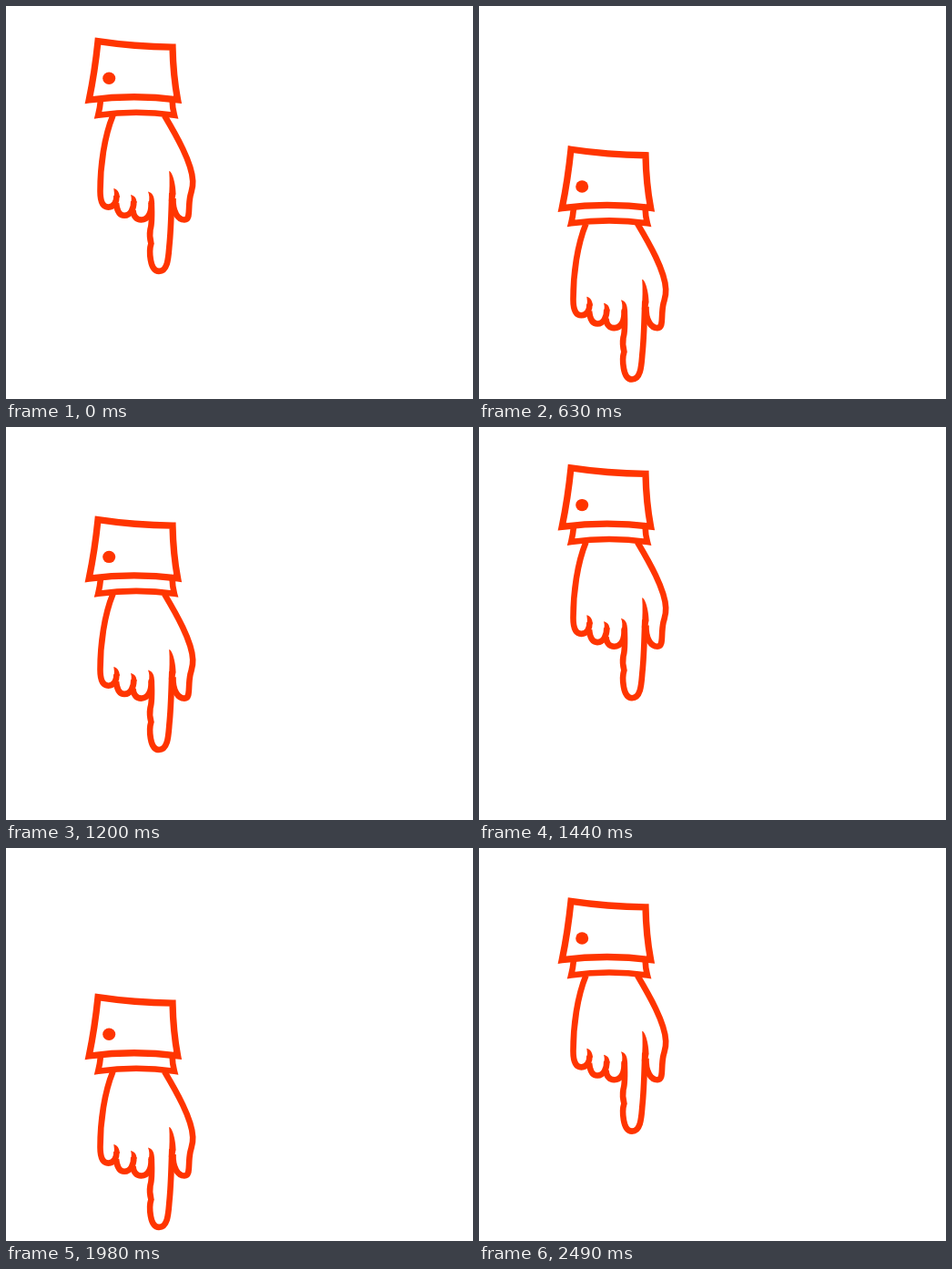
An HTML page with a canvas for the animation above (2520 ms loop, 513 by 431 pixels).

```html
<!DOCTYPE html>
<html lang="en">
<head>
<meta charset="utf-8">
<title>Pointing hand</title>
<style>
  html, body { margin: 0; width: 100%; height: 100%; overflow: hidden; background: #fff; }
  canvas { display: block; }
</style>
</head>
<body>
<canvas id="stage" width="513" height="431"></canvas>
<script>
const ctx = document.getElementById('stage').getContext('2d');
const INK = '#ff3500';
const STEP = 30, STEPS = 84, TRAVEL = 135;

const cuff = new Path2D(
  'M101 38.6 Q141 44.6 183 45.1 Q183.6 76 188.6 102.8 Q140 96.6 91.2 103 Q97.6 72 101 38.6 Z');
const band = new Path2D(
  'M104 103 Q103.2 112 101.2 119.7 Q143 113.8 184.9 119.7 Q182.8 112 182.6 103');

const outlines = [
  // back of the hand and little finger
  'M117.5 120 C108 143 103.5 175 103.5 203 C103.5 214 106 220.6 112.5 220.6 C119 220.6 121.6 214 121.5 208',
  // ring finger
  'M121 216 C122 226 125 229.8 130 229.8 C137 229.8 140.5 222 140.3 214',
  // middle finger
  'M139.5 224 C140 231 143.5 234.5 148.5 234.5 C156 234.5 159.6 227 159.8 216',
  // index finger
  'M159.7 214 C160.3 228 160.8 238 158.5 245 C157.3 252 158.2 256 159.4 260.5 ' +
  'C157 268 157.6 290.9 168 290.9 C178 290.9 178.4 275 179.4 263 C181.3 245 181.6 225 182.3 205',
  // thumb and wrist
  'M183.5 211 C183 226 189 234.5 196 234.5 C203.3 234.5 199.5 222 202.5 208 ' +
  'C204 202 205.6 199 205.2 192 C204.5 172 186.5 141 174 120'
].map(d => new Path2D(d));

// tapered tips of the creases between the fingers
const creases = new Path2D([
  'M118.3 200 C122.5 201 125 205 124.8 210 L118.2 210 C119.6 206 118.6 203 118.3 200 Z',
  'M137 207 C141.5 208 143.6 211 143.5 216 L137 216 C138.4 212 137.6 209 137 207 Z',
  'M156 203.5 C161 205 163.2 209 163 217 L156.6 217 C158 211 157.4 207 156 203.5 Z',
  'M179.2 181 C183.5 182 186.6 198 186.6 206 L184.8 214 L178.8 214 C179.6 203 180 191 179.2 181 Z'
].join(' '));

function bezier(x1, y1, x2, y2) {
  const at = (s, a, b) => 3 * (1 - s) ** 2 * s * a + 3 * (1 - s) * s * s * b + s ** 3;
  return x => {
    let lo = 0, hi = 1;
    for (let i = 0; i < 30; i++) {
      const mid = (lo + hi) / 2;
      if (at(mid, x1, x2) < x) lo = mid; else hi = mid;
    }
    return at(lo, y1, y2);
  };
}

const smooth = u => u * u * (3 - 2 * u);

// start and end in steps, position from and to, easing
const moves = [
  [1, 28, 0, 1, bezier(1 / 6, 1 / 6, 2 / 3, 1)],
  [28, 51, 1, 0, smooth],
  [51, 69, 0, 1, smooth],
  [69, 85.2, 1, 0, bezier(0.13, 0, 5 / 6, 5 / 6)]
];

function offsetAt(step) {
  const [start, end, from, to, ease] = moves.find(m => step < m[1]);
  const u = Math.max(0, (step - start) / (end - start));
  return TRAVEL * (from + (to - from) * ease(u));
}

function draw(ms) {
  const step = Math.floor(ms / STEP + 0.001) % STEPS;
  ctx.fillStyle = '#fff';
  ctx.fillRect(0, 0, 513, 431);
  ctx.save();
  ctx.translate(0, offsetAt(step));
  ctx.strokeStyle = ctx.fillStyle = INK;
  ctx.lineJoin = 'miter';
  ctx.lineWidth = 7.3;
  ctx.stroke(cuff);
  ctx.lineWidth = 6.6;
  ctx.stroke(band);
  outlines.forEach(path => ctx.stroke(path));
  ctx.fill(creases);
  ctx.beginPath();
  ctx.ellipse(113.2, 79.3, 7, 6.7, 0, 0, Math.PI * 2);
  ctx.fill();
  ctx.restore();
}

const startTime = performance.now();
function tick() {
  draw(performance.now() - startTime);
  requestAnimationFrame(tick);
}
tick();
</script>
</body>
</html>
```
